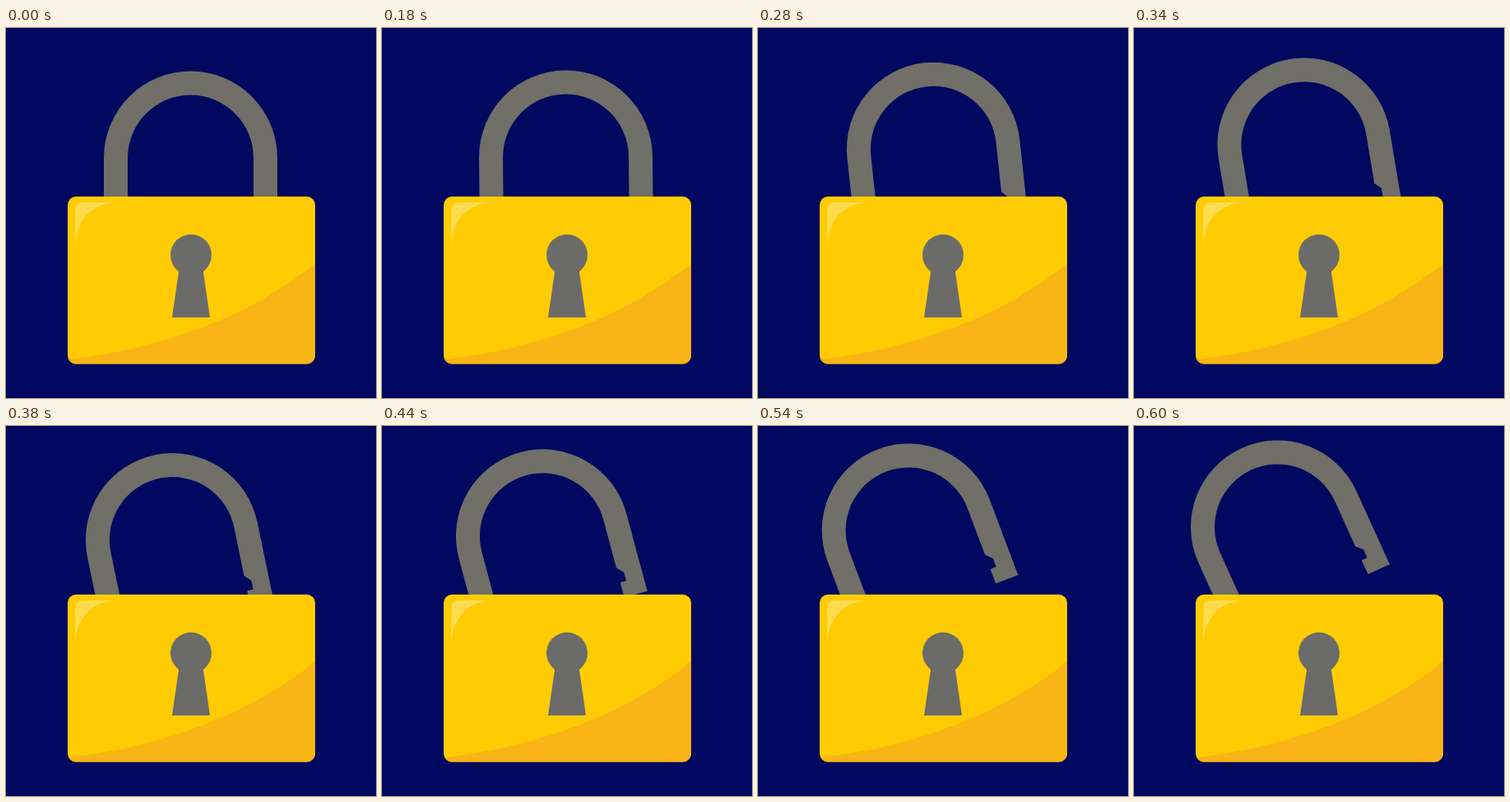
Write an HTML page that moves like this. It is 450 by 450 pixels and loops after 2000 ms.

```html
<!DOCTYPE html>
<html lang="en">
<head>
<meta charset="utf-8">
<title>Padlock opening</title>
<style>
  html, body { margin: 0; width: 100%; height: 100%; overflow: hidden; background: #01085f; }
  svg { display: block; width: 100vw; height: 100vh; }
</style>
</head>
<body>
<svg viewBox="0 0 450 450">
  <defs>
    <clipPath id="bodyClip"><rect x="75" y="205" width="301" height="203.5" rx="10"/></clipPath>
  </defs>
  <path id="shackle" fill="#706f68" d="M119 290 V158 A105.5 105.5 0 0 1 330 158 V255.7 H301
    V237 H308.5 V226 L301 218.5 V158 A76.5 76.5 0 0 0 148 158 V290 Z"/>
  <g clip-path="url(#bodyClip)">
    <rect x="75" y="205" width="301" height="204" fill="#ffcc03"/>
    <path fill="#fab416" d="M75 403.5 Q258 381 377 286 V410 H75 Z"/>
  </g>
  <path fill="#ffdc4d" d="M84 265 V222 Q84 212 94 212 H133 Q88 216 84 265 Z"/>
  <g fill="#6b6b6a">
    <circle cx="225" cy="276" r="25"/>
    <path d="M211 290 H239 L248 352 H202 Z"/>
  </g>
</svg>
<script>
  const LOOP = 2000, START = 180, END = 600, STEP = 20;
  const OPEN_ANGLE = 24.4, STEP_ANGLE = 1.115;
  const PIVOT = "118.5 256";
  const shackle = document.getElementById("shackle");

  // Even steps, then a slightly larger one into the open pose.
  function angleAt(time) {
    if (time < START) return 0;
    if (time >= END) return OPEN_ANGLE;
    const step = Math.floor((time - START) / STEP);
    return (step + 0.5) * STEP_ANGLE;
  }

  const origin = performance.now();
  function draw() {
    const time = (performance.now() - origin) % LOOP;
    shackle.setAttribute("transform", `rotate(${-angleAt(time)} ${PIVOT})`);
    requestAnimationFrame(draw);
  }
  draw();
</script>
</body>
</html>
```
